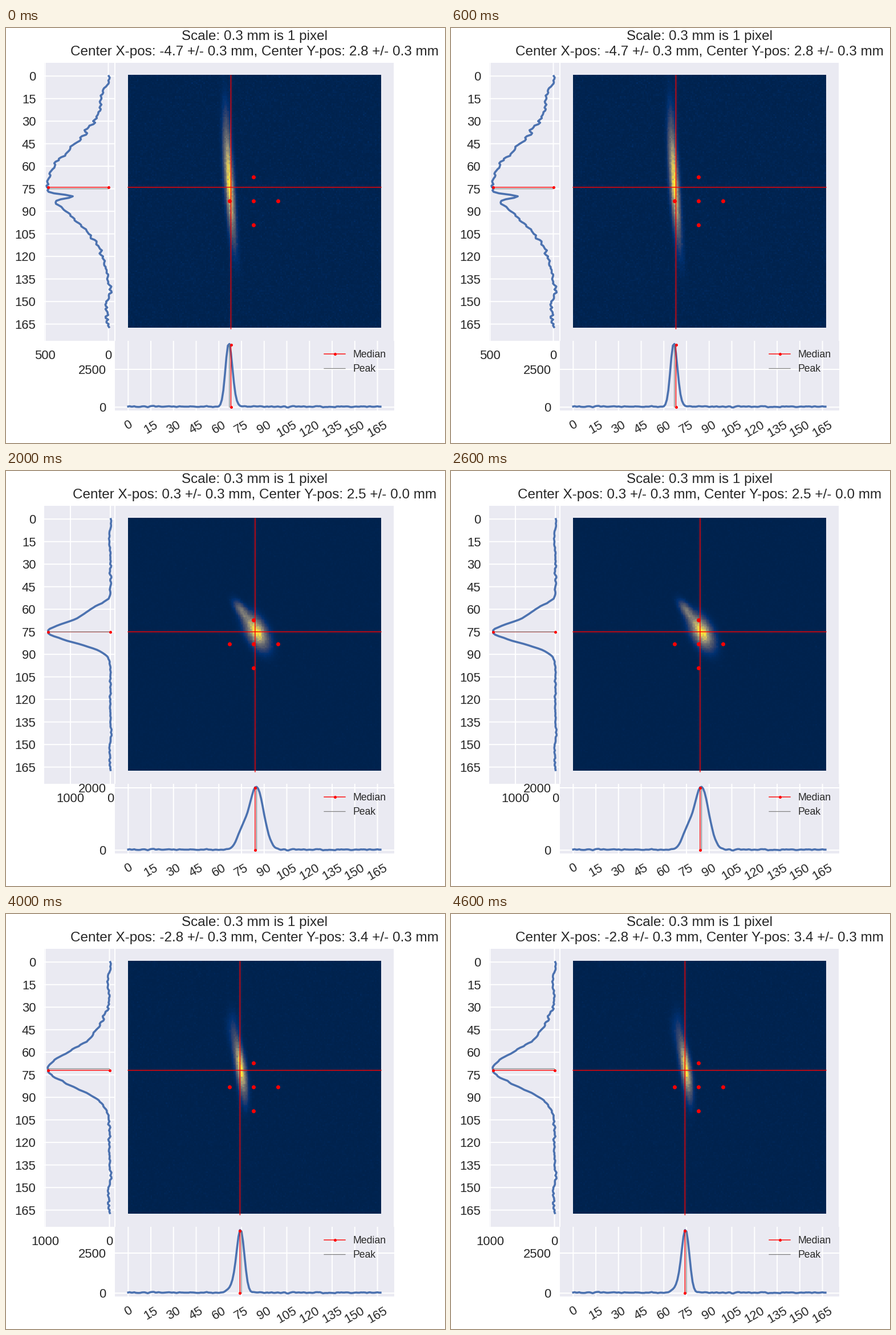
These frames come from a looping animation (770 by 727 pixels, 5 s). A matplotlib script:

```python
import numpy as np
import matplotlib.pyplot as plt
from matplotlib.animation import FuncAnimation
from matplotlib.patches import Rectangle

W, H, DPI = 770, 727, 64
PT = 72 / DPI                      # points per pixel
N = 168                            # camera pixels per side
MID = 83                           # camera centre
MM = 0.3125                        # millimetres per camera pixel
Y0 = 664.2                         # zero line of the bottom plot
PANEL, BLUE, INK = "#eaeaf2", "#4c72b0", "#262626"
plt.rcParams["font.family"] = "Liberation Sans"

idx = np.arange(N)

# beams: (amp, row, col, slope, bend, sigma up, sigma down, width)
# left:  (tick label, zero x, tick x), bottom: (tick label, tick y)
SHOTS = [
    dict(median=(68, 74), peak=(67, 75), noise=2.8, dip=80.3,
         left=("500", 179.5, 68.5), bottom=("2500", 598),
         beams=[(1, 72, 66.8, .065, .0003, 25, 22, 1.8)]),
    dict(median=(72, 74), peak=(72, 76), noise=2.5,
         left=("500", 183, 105), bottom=("2000", 596),
         beams=[(1, 74, 72.1, .13, -.0008, 19, 15.5, 2.3)]),
    dict(median=(84, 75), peak=(85, 75), noise=1,
         left=("1000", 183, 113), bottom=("2000", 555),
         beams=[(1, 75, 84.8, .35, 0, 6.5, 6.9, 4.2),
                (.45, 61, 74.8, .55, 0, 4, 5, 2.4)]),
    dict(median=(76, 87), peak=(75, 82), noise=1.7,
         left=("1000", 181.5, 68.5), bottom=("2500", 599),
         beams=[(1, 83, 75.2, -.04, 0, 10.3, 13, 2.5),
                (.08, 112, 74, 0, 0, 12, 12, 3.5)]),
    dict(median=(74, 72), peak=(75, 71), noise=1.6,
         left=("1000", 181.5, 68.5), bottom=("2500", 594),
         beams=[(1, 71, 74.4, .14, -.001, 12, 11.5, 2),
                (.08, 44, 69, 0, 0, 8, 8, 3)]),
]


def px(col):
    return 214.3 + 2.65 * col


def py(row):
    return 84.2 + 2.633 * row


def bell(v, centre, lo, hi=None):
    sigma = np.where(v < centre, lo, hi or lo)
    return np.exp(-.5 * ((v - centre) / sigma) ** 2)


def beam(shot):
    r, c = np.mgrid[:N, :N]
    img = np.zeros((N, N))
    for amp, row, col, slope, bend, up, down, width in shot["beams"]:
        d = r - row
        axis = col + slope * d + bend * d ** 2
        img += amp * bell(r, row, up, down) * bell(c, axis, width)
    return img


def grainy(img, noise, seed):
    rng = np.random.default_rng(seed)
    speckle = 1 + .06 * rng.standard_normal(img.shape)
    return img * speckle + .005 * noise * np.abs(rng.standard_normal(img.shape))


def hum(seed):
    raw = np.random.default_rng(seed).standard_normal(N)
    return np.convolve(raw, [.5, .5], "same")


def projection(img, axis, height):
    total = img.sum(axis)
    return height * total / total.max()


fig = plt.figure(figsize=(W / DPI, H / DPI), dpi=DPI, facecolor="white")
ax = fig.add_axes([0, 0, 1, 1])


def box(x0, y0, x1, y1):
    ax.add_patch(Rectangle((x0, y0), x1 - x0, y1 - y0, fc=PANEL, lw=0, zorder=0))


def line(xs, ys, color, width, z=3, **kw):
    ax.plot(xs, ys, color=color, lw=width * PT, zorder=z, snap=False, **kw)


def grid(xs, ys):
    line(xs, ys, "white", 2, 1, solid_capstyle="butt")


def dots(xs, ys, size):
    ax.plot(xs, ys, "o", color="red", ms=size * PT, mew=0, zorder=6, snap=False)


def text(x, y, s, size=22, ha="center", **kw):
    kw.setdefault("va", "baseline")
    ax.text(x, y, s, size=size * PT, ha=ha, color=INK, zorder=7, **kw)


def median_line(xs, ys):
    line(xs, ys, "red", 1.4, 4)
    dots(xs, ys, 5)


def peak_line(xs, ys):
    line(xs, ys, "gray", 1.2, 5)


def draw_title(median, peak):
    x, y = (median[0] - MID) * MM, (MID - median[1]) * MM
    dx, dy = (abs(m - p) * MM for m, p in zip(median, peak))
    text(436, 20.7, "Scale: 0.3 mm is 1 pixel", 24.25)
    text(436, 47.7, f"Center X-pos: {x:.1f} +/- {dx:.1f} mm, "
                    f"Center Y-pos: {y:.1f} +/- {dy:.1f} mm", 24.25)


def draw_axes(left, bottom):
    box(67, 61, 190, 548)
    box(192, 61, 680, 548)
    box(191, 548, 681, 670)
    for t in range(0, N, 15):
        grid([67, 190], [py(t)] * 2)
        text(52.5, py(t) + 8, str(t), ha="right")
        grid([px(t)] * 2, [548, 670])
        text(px(t), 684.5, str(t), va="top", rotation=30)
    for s, x in (("0", left[1]), (left[0], left[2])):
        grid([x, x], [61, 548])
        text(x, 580, s)
    for s, y in (("0", Y0), bottom):
        grid([191, 681], [y, y])
        text(175.5, y + 8, s, ha="right")


def draw_legend():
    line([558, 595], [571, 571], "red", 1.4)
    dots([576.5], [571], 5)
    text(608, 577, "Median", 17.6, "left")
    peak_line([558, 595], [596.5, 596.5])
    text(608, 602, "Peak", 17.6, "left")


def draw(k):
    shot = SHOTS[k]
    noise, x0 = shot["noise"], shot["left"][1]
    ax.cla()
    ax.axis("off")
    draw_title(shot["median"], shot["peak"])
    draw_axes(shot["left"], shot["bottom"])

    # Camera image with crosshair and reference points
    img = beam(shot)
    ax.imshow(grainy(img, noise, 40 + k), cmap="cividis", vmin=0, vmax=1.03,
              extent=(214, 657.3, 525.3, 83), aspect="auto",
              interpolation="nearest", zorder=1)
    mx, my = px(shot["median"][0]), py(shot["median"][1])
    line([214, 658], [my, my], "red", 1.4)
    line([mx, mx], [83, 527], "red", 1.4)
    for dc, dr in ((0, 0), (-16, 0), (16, 0), (0, -16), (0, 16)):
        dots([px(MID + dc)], [py(MID + dr)], 7)

    # Projections, with a fixed drift along the rows
    drift = 1.5 * bell(idx, 15, 4) - 2 * bell(idx, 141, 3) + bell(idx, 152, 7)
    rows = projection(img, 1, x0 - 74) + noise * (hum(8) + drift)
    if "dip" in shot:
        rows -= 38 * bell(idx, shot["dip"], 1.2)
    cols = projection(img, 0, Y0 - 554.5) + 1 + .7 * hum(21)
    line(x0 - rows, py(idx), BLUE, 3.6, 2)
    line(px(idx), Y0 - cols, BLUE, 3.6, 2)
    median_line([73.5, x0], [my, my])
    median_line([mx, mx], [555, Y0])
    gx, gy = px(shot["peak"][0]), py(shot["peak"][1])
    peak_line([73.5, x0], [gy, gy])
    peak_line([gx, gx], [555, Y0])
    draw_legend()

    ax.set_xlim(0, W)
    ax.set_ylim(H, 0)
    return []


anim = FuncAnimation(fig, draw, frames=len(SHOTS), init_func=lambda: [],
                     interval=1000, repeat=True, repeat_delay=0)
plt.show()
```
